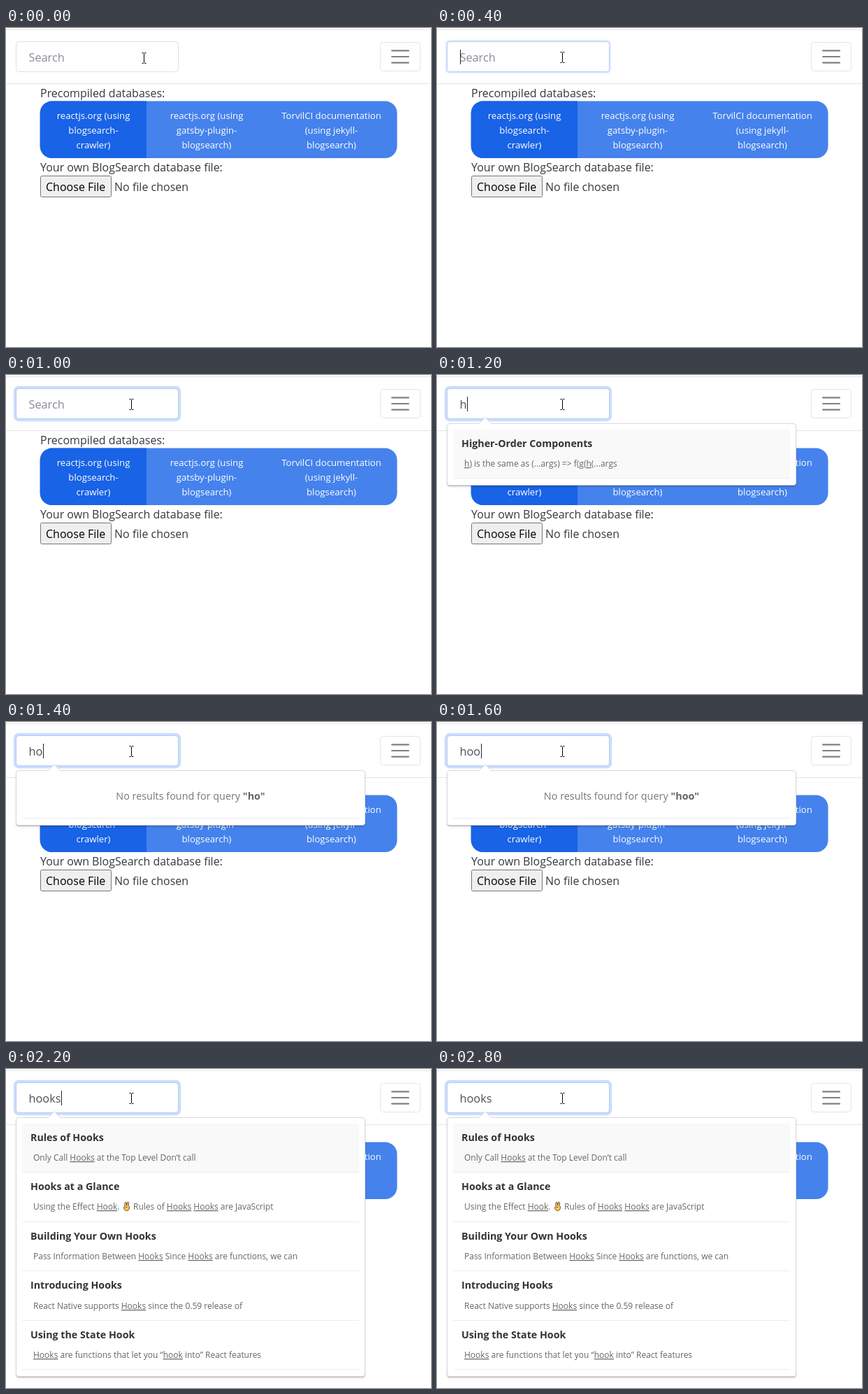
Write an HTML page that moves like this. It is 608 px wide and 456 px high and loops after 3 s.

```html
<!DOCTYPE html>
<html lang="en">
<head>
<meta charset="utf-8">
<title>Blog search demo</title>
<style>
  html, body { margin: 0; width: 100%; height: 100%; overflow: hidden; background: #fff; }
  svg { display: block; width: 608px; height: 456px; font: 16px "Open Sans", "Noto Sans", sans-serif; fill: #343a40; }
  .line { fill: none; stroke: #e5e5e5; }
  .icon { stroke: #808080; stroke-width: 2.15; stroke-linecap: round; }
  .buttons { font-size: 13.2px; font-weight: 500; fill: #fff; text-anchor: middle; }
  .panel { fill: #fff; stroke: #d9d9d9; filter: drop-shadow(0 1px 0 rgba(0,0,0,.2)) drop-shadow(0 2px 1.5px rgba(0,0,0,.1)); }
  .title { font-size: 14.25px; font-weight: 700; fill: #333; }
  .snippet { font-size: 12px; fill: #666; }
  .snippet tspan { text-decoration: underline; }
  .empty { font-size: 14.4px; fill: #777; text-anchor: middle; }
  .empty tspan { font-weight: 700; fill: #666; }
  #query { font-size: 16.3px; }
</style>
</head>
<body>
<svg viewBox="0 0 608 456">
  <path class="line" d="M0 2.5H608M0 79.5H608"/>
  <rect class="line" x="535.5" y="20.5" width="57" height="41" rx="4"/>
  <path class="icon" d="M552.1 32.4H575.9M552.1 41H575.9M552.1 49.6H575.9"/>

  <text x="49" y="99">Precompiled databases:</text>
  <rect x="48.7" y="104.6" width="510.8" height="81.4" rx="17" fill="#4582ec"/>
  <path d="M201 104.6H65.7a17 17 0 0 0-17 17V169a17 17 0 0 0 17 17H201z" fill="#1863e6"/>
  <g class="buttons" id="buttons"></g>
  <text x="49" y="205">Your own BlogSearch database file:</text>
  <rect x="49.5" y="211.5" width="101" height="30" rx="2" fill="#efefef" stroke="#767676"/>
  <text x="57" y="233" fill="#000">Choose File</text>
  <text x="155" y="233">No file chosen</text>

  <rect id="ring" fill="#4582ec"/>
  <rect id="input" x="14.5" y="19.5" width="232" height="43" rx="4" fill="#fff"/>
  <text id="query" x="32.5" y="48"></text>
  <path id="caret" stroke="#222" d="M0 31V52"/>
  <g id="dropdown"></g>
  <path id="pointer" fill="none" stroke="#000" d="M-3 -7.5H-1L0 -6.5L1 -7.5H3M0 -6.5V6.5M-3 7.5H-1L0 6.5L1 7.5H3"/>
</svg>
<script>
const LOOP = 3000, STEP = 200, ROW = 70.6;
const $ = id => document.getElementById(id);
const set = (node, attrs) => Object.entries(attrs).forEach(([k, v]) => node.setAttribute(k, v));

const buttonLabels = [
  [125, 'reactjs.org (using', 'blogsearch-', 'crawler)'],
  [287, 'reactjs.org (using', 'gatsby-plugin-', 'blogsearch)'],
  [465.5, 'TorvilCI documentation', '(using jekyll-', 'blogsearch)'],
];
$('buttons').innerHTML = buttonLabels.map(([x, ...lines]) =>
  lines.map((line, i) => `<text x="${x}" y="${130 + 21 * i}">${line}</text>`).join('')).join('');

// Underscores mark the underlined matches.
const singleResult = [['Higher-Order Components', '_h_) is the same as (...args) =&gt; f(g(_h_(...args']];
const hookResults = [
  ['Rules of Hooks', 'Only Call _Hooks_ at the Top Level Don’t call'],
  ['Hooks at a Glance', 'Using the Effect _Hook_.', 'Rules of _Hooks_ _Hooks_ are JavaScript'],
  ['Building Your Own Hooks', 'Pass Information Between _Hooks_ Since _Hooks_ are functions, we can'],
  ['Introducing Hooks', 'React Native supports _Hooks_ since the 0.59 release of'],
  ['Using the State Hook', '_Hooks_ are functions that let you “_hook_ into” React features'],
];

const snippet = (x, y, text) =>
  `<text class="snippet" x="${x}" y="${y}">${text.replace(/_(.+?)_/g, '<tspan>$1</tspan>')}</text>`;

const separator = y => `<path d="M23 ${y}.5H505" stroke="#ededed"/>`;

const panel = bottom => `
  <rect class="panel" x="14.5" y="69.5" width="499" height="${bottom - 70}" rx="3.5"/>
  <path d="M59.5 70.5L69 61L78.5 70.5" fill="#fff"/>
  <path d="M60 69.5L69 60.5L78 69.5" fill="none" stroke="#d9d9d9"/>`;

const victoryHand = y => `
  <path transform="translate(167.5 ${y})" fill="#fdc65c" stroke="#4a3a20" stroke-width=".8" stroke-linejoin="round"
    d="M2.6 6.5L2.4 1.8Q3.2 .2 4.6 1.4L5.2 5.5L5.8 1.2Q7.2 0 8.2 1.4L7.8 6Q9.4 7 9 9.6Q8.2 13.2 5 13.2Q1.4 13 .9 9Q1 7 2.6 6.5ZM3 8.2L6 7.8"/>`;

function resultList(results) {
  const rowY = (first, i) => Math.floor(first + ROW * i);
  const rows = results.map(([title, text, more], i) => {
    const textY = rowY(131.3, i);
    return `<text class="title" x="35" y="${rowY(103, i)}">${title}</text>`
      + snippet(39, textY, text)
      + (more ? victoryHand(textY - 11.5) + snippet(182, textY, more) : '')
      + separator(rowY(147.5, i));
  });
  return panel(rowY(147.5, results.length - 1) + 11)
    + '<rect x="23" y="78" width="482" height="69" fill="#f9f9f9"/>' + rows.join('');
}

const noResults = query => panel(148)
  + `<text class="empty" x="264" y="111">No results found for query <tspan>"${query}"</tspan></text>`
  + separator(137);

function dropdown(query) {
  if (!query) return '';
  if (query === 'h') return resultList(singleResult);
  return query.startsWith('hook') ? resultList(hookResults) : noResults(query);
}

function draw(time) {
  const query = 'hooks'.slice(0, Math.max(0, time / STEP - 5));
  const focus = time < 400 ? 0 : time < 600 ? 0.6 : 1;
  const spread = 3.2 * focus;
  const caretOn = (time >= 400 && time < 800) || (time >= 1200 && time < 2600);

  set($('ring'), {
    x: 14 - spread, y: 19 - spread, rx: 4 + spread,
    width: 233 + 2 * spread, height: 44 + 2 * spread, opacity: 0.27 * focus,
  });
  set($('input'), { stroke: focus ? '#b3ccf8' : '#e1e1e1' });
  $('query').textContent = query || 'Search';
  set($('query'), { fill: query ? '#495057' : '#868e96' });
  const typedWidth = query ? $('query').getComputedTextLength() : 0;
  set($('caret'), {
    transform: `translate(${Math.round(33 + typedWidth) + 0.5} 0)`,
    visibility: caretOn ? 'visible' : 'hidden',
  });
  $('dropdown').innerHTML = dropdown(query);
  set($('pointer'), { transform: time < 200 ? 'translate(197.5 43)' : 'translate(179.5 42)' });
}

const start = performance.now();
let shown = -1;
function tick() {
  const elapsed = (performance.now() - start) % LOOP;
  const time = Math.floor(elapsed / STEP) * STEP;
  if (time !== shown) draw(shown = time);
  requestAnimationFrame(tick);
}
tick();
</script>
</body>
</html>
```
